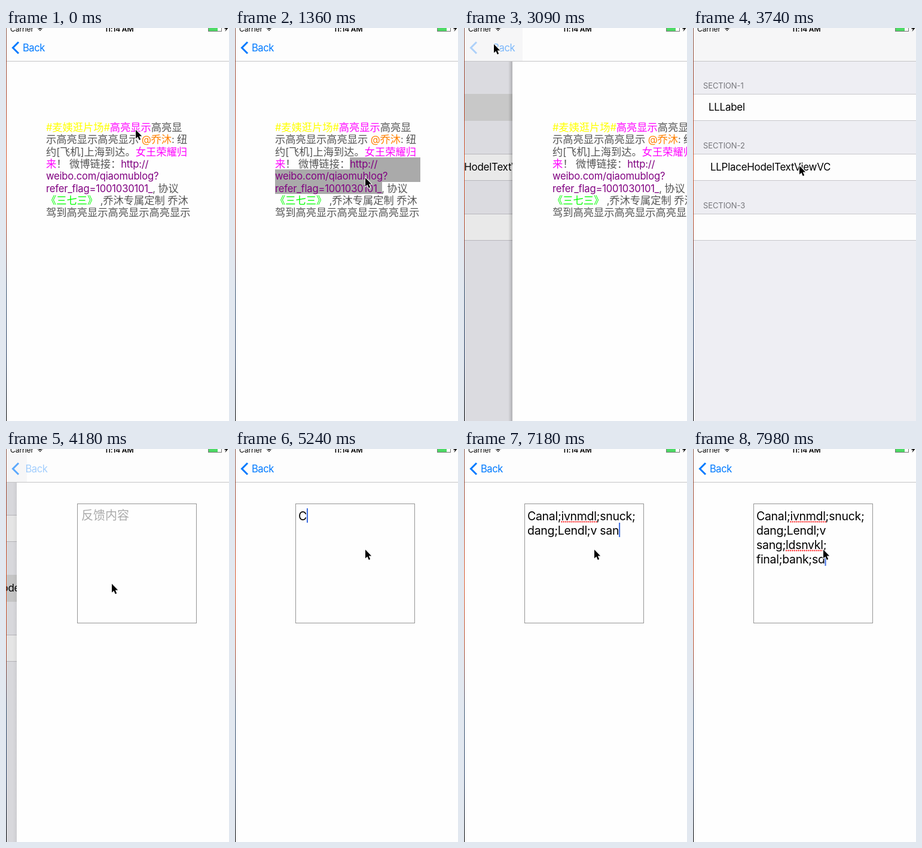
Recreate the animation shown at these times as an HTML page with a canvas. Size 373 by 656 pixels, loop 8000 ms.

```html
<!DOCTYPE html>
<html lang="zh-CN">
<head>
<meta charset="utf-8">
<title>Rich text label</title>
<style>
html, body { margin: 0; width: 100%; height: 100%; overflow: hidden; background: #fff; }
canvas { display: block; width: 373px; height: 656px; }
</style>
</head>
<body>
<canvas id="stage"></canvas>
<script>
const W = 373, H = 656, LOOP = 8000;
const canvas = document.getElementById('stage');
const ctx = canvas.getContext('2d');
const dpr = window.devicePixelRatio || 1;
canvas.width = W * dpr;
canvas.height = H * dpr;

const SANS = 'Inter, "Noto Sans CJK SC", "Noto Sans CJK", sans-serif';
const BLUE = '#007aff', GREY = '#555', PURPLE = '#800080', PINK = '#f0f';
const clamp = v => Math.max(0, Math.min(1, v));
const smooth = u => u * u * (3 - 2 * u);
const spring = ms => {
  const u = Math.max(0, ms) * 0.019;
  return 1 - (1 + u) * Math.exp(-u);
};

function rect(x, y, w, h, color) {
  ctx.fillStyle = color;
  ctx.fillRect(x, y, w, h);
}
function setFont(size, gap = 0, weight = 400) {
  ctx.font = `${weight} ${size}px ${SANS}`;
  ctx.letterSpacing = gap + 'px';
}
const widthOf = str => ctx.measureText(str).width;
function text(str, x, y, color) {
  ctx.fillStyle = color;
  ctx.fillText(str, x, y);
}
function faded(alpha, paint) {
  ctx.globalAlpha = alpha;
  paint();
  ctx.globalAlpha = 1;
}

// Rich label: each span is [text, colour, time of tap]
const spans = [
  ['#麦姨逛片场#', '#ff0'], ['高亮显示', PINK, 60], ['高亮显示高亮显示高亮显示 ', GREY],
  ['@乔沐', '#ff8000'], [': 纽约[飞机]上海到达。', GREY], ['女王荣耀归来', PINK, 740],
  ['！ 微博链接：', GREY], ['http://weibo.com/qiaomublog?refer_flag=1001030101_', PURPLE, 1360],
  [', 协议', GREY], ['《三七三》', '#0f0', 1960],
  [' ,乔沐专属定制 乔沐驾到高亮显示高亮显示高亮显示', GREY]
];
const LABEL = { left: 67, right: 310, top: 155, pitch: 20.3, hold: 150 };
const TOKEN = /http:\/\/|[\w.\/=]+\??|《.|./gu;
const tokenFont = str => /^[ -~]/.test(str) ? setFont(16.6, -0.2) : setFont(17.25);

function layoutLabel() {
  let x = LABEL.left, line = 0;
  return spans.flatMap(([str, color, tap]) => str.match(TOKEN).map(token => {
    tokenFont(token);
    const w = widthOf(token);
    if (x + w > LABEL.right) {
      x = LABEL.left;
      line++;
    }
    x += w;
    return { token, color, tap, line, x: x - w, end: x };
  }));
}

function labelPage(t) {
  const items = layoutLabel();
  const lineTop = line => Math.round(LABEL.top + line * LABEL.pitch);
  items.forEach((it, i) => {
    if (!(t >= it.tap && t < it.tap + LABEL.hold)) return;
    const next = items[i + 1];
    const wraps = next.tap === it.tap && next.line > it.line;
    const y = lineTop(it.line), x = Math.floor(it.x);
    rect(x, y, Math.ceil(wraps ? LABEL.right : it.end) - x, lineTop(it.line + 1) - y, '#aaa');
  });
  for (const it of items) {
    tokenFont(it.token);
    text(it.token, it.x, LABEL.top + 17 + it.line * LABEL.pitch, it.color);
  }
}

const typed = 'Canal;ivnmdl;snuck; dang;Lendl;v sang;ldsnvkl; final;bank;sd';
const misspelt = ['ivnmdl', 'ldsnvkl'];
// Typing bursts: first key, last key, number of keys
const bursts = [[5240, 5330, 3], [5480, 5800, 7], [5950, 6300, 13], [6390, 6740, 6], [6980, 7980, 31]];
const keysBy = t => bursts.reduce((sum, [from, to, n]) =>
  t < from ? sum : sum + 1 + Math.floor(clamp((t - from) / (to - from)) * (n - 1)), 0);

function wrap(str, width) {
  return str.split(' ').reduce((lines, word) => {
    const joined = lines.length ? lines[lines.length - 1] + ' ' + word : word;
    if (lines.length && widthOf(joined) <= width) lines.pop();
    else return [...lines, word];
    return [...lines, joined];
  }, []);
}

function dots(x, y, w) {
  ctx.fillStyle = '#f33';
  for (let d = 1; d < w; d += 3.4) {
    ctx.beginPath();
    ctx.arc(x + d, y, 1.2, 0, 7);
    ctx.fill();
  }
}

function editPage(t) {
  const left = 106, top = 99, pitch = 24;
  ctx.strokeStyle = '#959595';
  ctx.lineWidth = 1;
  ctx.strokeRect(101.5, 91.5, 199, 199);
  const count = keysBy(t);
  if (!count) {
    setFont(20);
    text('反馈内容', 108, 118, '#aaa');
  }
  let str = typed.slice(0, count);
  if (count < 25) str = str.replace(' da', ' ds'); // before autocorrection
  setFont(19.5, -0.3);
  const lines = wrap(str, 188);
  lines.forEach((line, i) => {
    const y = top + 19.5 + i * pitch;
    text(line, left, y, '#000');
    for (const bad of misspelt) {
      const at = line.indexOf(bad);
      if (at >= 0) dots(left + widthOf(line.slice(0, at)), y + 3, widthOf(bad));
    }
  });
  const row = lines.length - 1;
  faded(clamp((t - 4880) / 120), () =>
    rect(left + widthOf(lines[row]), top + row * pitch, 2, pitch, '#3b6be0'));
}

const cells = ['LLLabel', 'LLPlaceHodelTextViewVC', ''];
function listPage(selected, strength) {
  rect(0, 0, W * 1.4, H, '#eeeef3');
  cells.forEach((name, i) => {
    const y = 110 + i * 100;
    setFont(13, -0.1);
    text('SECTION-' + (i + 1), 17, y - 9, '#77777c');
    rect(0, y, W * 1.4, 45, '#c8c7cc');
    rect(0, y + 1, W * 1.4, 43, '#fdfdfd');
    if (i === selected) faded(strength, () => rect(0, y, W * 1.4, 45, '#d9d9d9'));
    setFont(17, -0.3);
    text(name, i ? 29 : 26, y + 28, '#000');
  });
}

const chevron = new Path2D('M21 23.5 L11.5 33 L21 42.5');
function navBar(split, back, arrow, shift) {
  rect(0, 0, W, 55, '#fdfdfd');
  rect(0, 0, split, 55, '#f6f6f7');
  rect(0, 55, W, 1, '#c4c4c6');
  faded(arrow, () => {
    ctx.strokeStyle = BLUE;
    ctx.lineWidth = 3;
    ctx.stroke(chevron);
  });
  setFont(16.6, -0.5);
  faded(back, () => text('Back', 28 + shift, 39, BLUE));
}

const bolt = new Path2D('M369 -4 L365 1.5 H368 L366.5 6 L371.5 0 H368.5 Z');
function statusBar() {
  setFont(12, -0.05);
  text('Carrier', 7, 5.5, '#000');
  setFont(12, -0.2, 600);
  text('11:14 AM', 165, 5.5, '#000');
  ctx.strokeStyle = '#000';
  ctx.lineWidth = 1.8;
  for (let r = 1; r < 8; r += 2.9) {
    ctx.beginPath();
    ctx.arc(57, 5, r, -2.35, -0.79);
    ctx.stroke();
  }
  ctx.strokeStyle = '#777';
  ctx.lineWidth = 1;
  ctx.strokeRect(338.5, -4.5, 22, 10);
  rect(339, -4, 15, 9, '#4cd964');
  ctx.fillStyle = '#000';
  ctx.fill(bolt);
}

const wallpaper = ['#8a5a4c', '#a8452c', '#d8562a', '#b04a2c', '#35506e', '#20385c', '#000'];
function edgeStrip() {
  const g = ctx.createLinearGradient(0, 0, 0, H);
  wallpaper.forEach((c, i) => g.addColorStop(i / (wallpaper.length - 1), c));
  rect(0, 0, 1, H, g);
}

// Pointer moves: start, end, x, y
const moves = [
  [350, 720, 240, 206], [1030, 1340, 218, 250], [1690, 1940, 110, 291], [2280, 2730, 50, 27],
  [3240, 3740, 178, 230], [3950, 4000, 177, 225], [4190, 4410, 218, 168]
];
const arrowShape = new Path2D('M0 0 V14.5 L3.4 11.4 L5.8 17 L8.2 16 L5.8 10.4 H10.2 Z');
function pointer(t) {
  let x = 217, y = 170;
  for (const [from, to, nx, ny] of moves) {
    const u = smooth(clamp((t - from) / (to - from)));
    x += (nx - x) * u;
    y += (ny - y) * u;
  }
  ctx.save();
  ctx.translate(x, y);
  ctx.lineJoin = 'round';
  ctx.lineWidth = 2;
  ctx.strokeStyle = '#fff';
  ctx.stroke(arrowShape);
  ctx.fillStyle = '#000';
  ctx.fill(arrowShape);
  ctx.restore();
}

function draw(t) {
  ctx.setTransform(dpr, 0, 0, dpr, 0, 0);
  const pushing = t >= 3800;
  const ms = Math.max(0, t - (pushing ? 3930 : 3045));
  // 0: detail page covers the stage, 1: list is fully shown
  let open = pushing ? 1 - spring(ms) : spring(ms);
  if (open < 0.001) open = 0;
  if (open > 0.997) open = 1;
  const x = Math.round(open * W);

  if (open > 0) {
    ctx.save();
    ctx.translate(-Math.round((1 - open) * 115), 0);
    if (pushing) listPage(1, t >= 3950 ? 1 : 0);
    else listPage(0, clamp((1 - open) / 0.7));
    ctx.restore();
    rect(0, 0, W, H, `rgba(0,0,0,${0.1 * (1 - open)})`);
    if (open < 1) {
      const g = ctx.createLinearGradient(x - 7, 0, x, 0);
      g.addColorStop(0, 'rgba(0,0,0,0)');
      g.addColorStop(1, `rgba(0,0,0,${0.2 * clamp(open * 5)})`);
      rect(x - 7, 0, 7, H, g);
    }
  }
  if (open < 1) {
    ctx.save();
    ctx.translate(x, 0);
    rect(0, 0, W, H, '#fefefe');
    (pushing ? editPage : labelPage)(t);
    ctx.restore();
  }
  const back = pushing ? clamp((ms - 130) / 340) : clamp(1 - ms / 92);
  const arrow = pushing ? clamp(ms / 400) : clamp(1 - ms / 65);
  navBar(open > 0 ? x + 17 : 0, back, arrow, x / 4);
  statusBar();
  edgeStrip();
  pointer(t);
}

function tick() {
  draw(performance.now() % LOOP);
  requestAnimationFrame(tick);
}
tick();
</script>
</body>
</html>
```
